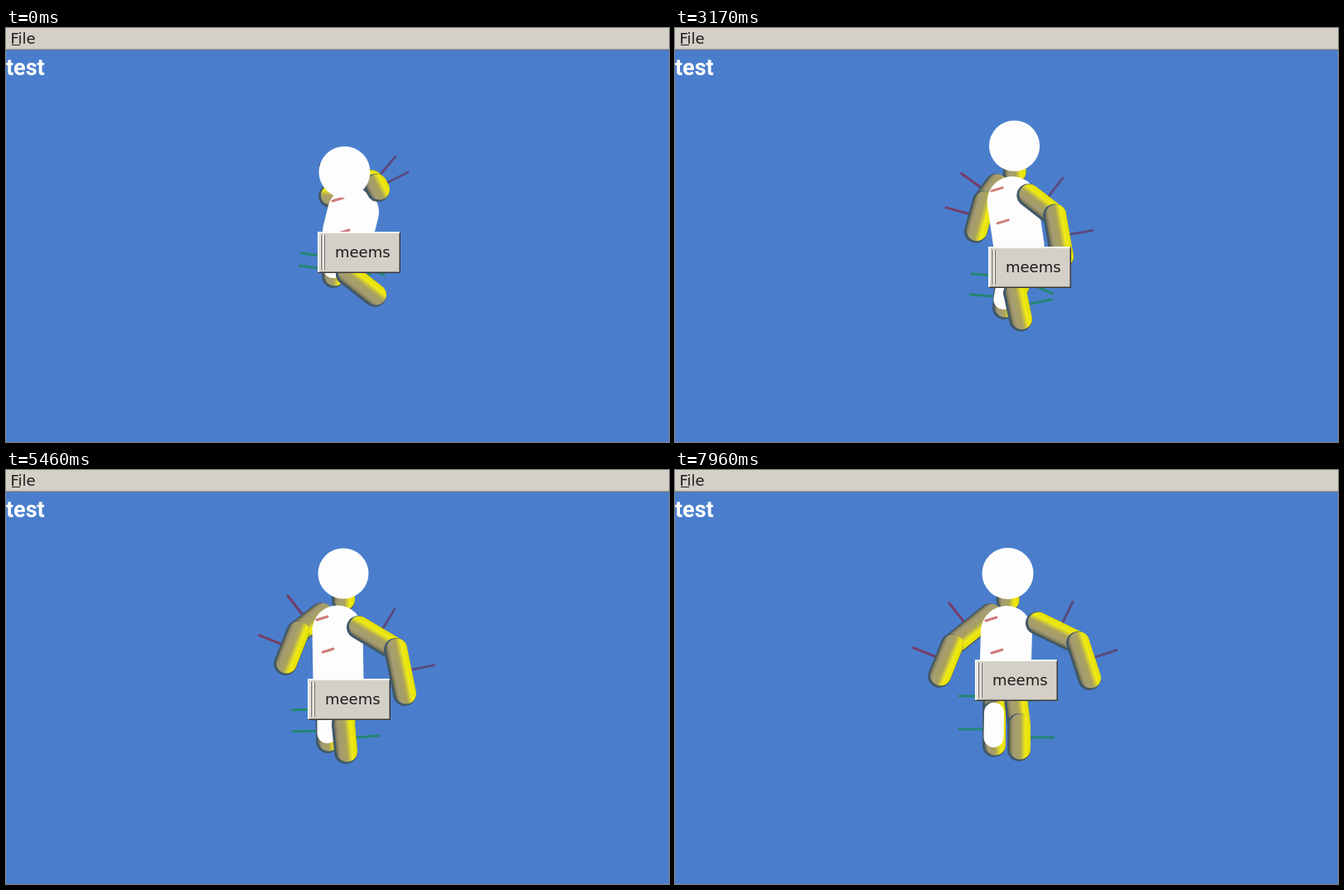
Write an HTML page with a canvas that moves like this. It is 800 px wide and 500 px high and loops after 8 s.

```html
<!DOCTYPE html>
<html>
<head>
<meta charset="utf-8">
<style>
html, body { margin: 0; width: 100%; height: 100%; overflow: hidden; background: #4a7ecd; }
canvas { display: block; }
</style>
</head>
<body>
<canvas id="stage" width="800" height="500"></canvas>
<script>
const c = document.getElementById('stage').getContext('2d');
const LOOP = 8000, STEP = 1000 / 24;
const WHITE = '#fdfdfd', INK = '#1c1c1c', FACE = '#d4d0c8';
const UI = '18px "DejaVu Sans", sans-serif';

// A pose is the head radius, then points: panel, head, chest, left elbow and hand,
// right shoulder, elbow and hand, left foot, right knee and foot.
const tuck = [31, 376,246, 408.5,174, 419,222, 397,203, 391,203,
  440,185, 446,190, 449,196, 395,300, 412,297, 445,323];
const lean = [29.5, 367,256, 467,185, 424,222, 410,196, 385,188,
  428,226, 402,258, 357,246, 402,336, 442,328, 408,346];
const crouch = [27.5, 372,250, 454,175, 414,218, 385,191, 346,187,
  430,219, 430,245, 400,244, 394,344, 444,315, 416,343];
const stand = [30.5, 364,252, 407,125, 400,194, 352,196, 337,234,
  425,190, 470,217, 481,271, 388,328, 407,308, 410,341];
const reach = [28, 364,240, 419.5,136, 389,187, 345,171, 301,158,
  425,186, 442,220, 445,225, 384,324, 412,295, 413,337];
const spread = [31, 362,229, 401.5,125, 400,195, 334,212, 319,249,
  437,185, 486,209, 500,252, 385,333, 415,308, 415,338];

const moved = (pose, dx, dy, squeeze = 1) => pose.map((v, i) =>
  i === 0 ? v : i % 2 ? 407 + (v - 407) * squeeze + dx : v + dy);
const tuckHigh = [30.5, 371, 228, ...moved(tuck, 2, -9).slice(3)];

const keys = [
  [0, tuck], [400, moved(tuck, 0, 38)], [760, moved(stand, 4, 14, .75)],
  [1380, lean], [2000, moved(spread, 14, -22, .95)],
  [2420, tuckHigh], [2840, moved(tuckHigh, 0, 44)], [3240, moved(stand, 4, 10, .75)],
  [3880, crouch], [4560, moved(spread, 8, -20)],
  [5460, stand], [6630, reach], [7080, moved(spread, 0, -21)], [7960, spread]
].map(([t, v]) => ({ t, v }));

function sample(t) {
  const last = keys.length - 1;
  let i = 0;
  while (i < last - 1 && t > keys[i + 1].t) i++;
  const a = keys[i], b = keys[i + 1];
  const before = keys[Math.max(0, i - 1)], after = keys[Math.min(last, i + 2)];
  const span = b.t - a.t, u = Math.min(1, (t - a.t) / span);
  const u2 = u * u, u3 = u2 * u;
  return a.v.map((v, k) => {
    const m = .7 * (b.v[k] - before.v[k]) / (b.t - before.t) * span;
    const n = .7 * (after.v[k] - v) / (after.t - a.t) * span;
    return v * (2 * u3 - 3 * u2 + 1) + b.v[k] * (3 * u2 - 2 * u3)
      + m * (u3 - 2 * u2 + u) + n * (u3 - u2);
  });
}

const add = ([x, y], dx, dy) => [x + dx, y + dy];
const mid = (a, b) => [(a[0] + b[0]) / 2, (a[1] + b[1]) / 2];

// Unit normal of a segment, on the side that faces (fx, fy).
function normal(a, b, fx, fy) {
  const dx = b[0] - a[0], dy = b[1] - a[1], len = Math.hypot(dx, dy) || 1;
  const side = dx * fy - dy * fx < 0 ? -1 : 1;
  return [-dy / len * side, dx / len * side];
}

function line(a, b, width, color) {
  c.lineWidth = width;
  c.strokeStyle = color;
  c.beginPath();
  c.moveTo(...a);
  c.lineTo(...b);
  c.stroke();
}

// A round limb lit from the upper right, with a dark rim on the far side.
function limb(a, b, r) {
  line(a, b, 2 * r, '#42596a');
  a = add(a, 1.5, -1);
  b = add(b, 1.5, -1);
  const [nx, ny] = normal(a, b, .75, -.5), m = mid(a, b);
  const g = c.createLinearGradient(...add(m, -nx * r, -ny * r), ...add(m, nx * r, ny * r));
  g.addColorStop(.05, '#77734f');
  g.addColorStop(.2, '#a39b73');
  g.addColorStop(.5, '#aaa25e');
  g.addColorStop(.72, '#f0ea16');
  g.addColorStop(1, '#dedb00');
  line(a, b, 2 * r - 3, g);
}

// Two limbs, each with a thin axis pointing away from the body.
function jointed(points, side, color) {
  const pairs = [points.slice(0, 2), points.slice(1)];
  for (const [a, b] of pairs) {
    const [nx, ny] = normal(a, b, side, -.5), m = mid(a, b);
    line(m, add(m, nx * 42, ny * 42), 3, color);
  }
  for (const [a, b] of pairs) limb(a, b, 14);
}

function rect(x, y, w, h, color) {
  c.fillStyle = color;
  c.fillRect(x, y, w, h);
}

function text(s, x, y, font, color) {
  c.font = font;
  c.fillStyle = color;
  c.fillText(s, x, y);
}

function panel(x, y) {
  x = Math.round(x);
  y = Math.round(y);
  rect(x, y, 100, 50, '#38383a');
  rect(x, y, 99, 49, '#f8f8f6');
  rect(x + 2, y + 2, 97, 47, '#85827c');
  rect(x + 2, y + 2, 96, 46, FACE);
  for (const gx of [3, 7]) {
    rect(x + gx, y + 4, 1, 42, '#fff');
    rect(x + gx + 1, y + 4, 1, 42, '#68655f');
  }
  text('meems', x + 21, y + 31, UI, INK);
}

function figure(t) {
  const [r, ...v] = sample(t);
  const [base, head, chest, lElbow, lHand, rShoulder, rElbow, rHand, lFoot, rKnee, rFoot] =
    Array.from({ length: v.length / 2 }, (_, i) => [v[2 * i], v[2 * i + 1]]);
  const lHip = add(base, 23, 24), rHip = add(base, 46, 24), lKnee = mid(lHip, lFoot);

  limb(head, add(head, 0, r + 2), 14);
  jointed([add(chest, -20, -20), lElbow, lHand], -1, '#753d67');
  line(chest, add(base, 37, 0), 2 * r, WHITE);
  jointed([lHip, lKnee, lFoot], -1, '#248573');
  line(lKnee, add(lFoot, -.5, -10), 24, WHITE);
  jointed([rHip, rKnee, rFoot], 1, '#248573');
  jointed([rShoulder, rElbow, rHand], 1, '#584b80');
  for (const stub of [add(chest, -25, -13), add(chest, -18, 26)]) {
    line(stub, add(stub, 13, -4), 3, '#cf7b7a');
  }
  line(head, head, 2 * r, WHITE);
  panel(...base);
}

function draw(now) {
  const t = Math.floor((now % LOOP) / STEP + .001) * STEP;
  c.lineCap = 'round';
  rect(0, 0, 800, 500, '#4a7ecd');
  figure(t);
  rect(0, 0, 800, 26, FACE);
  rect(0, 25, 800, 1, '#aaa7a1');
  rect(0, 26, 800, 1, '#66758f');
  text('File', 5.5, 19, UI, INK);
  rect(7, 20, 10, 1, INK);
  text('test', 0, 57, 'bold 27px Roboto, sans-serif', '#fff');
}

const start = performance.now();
function loop() {
  draw(performance.now() - start);
  requestAnimationFrame(loop);
}
loop();
</script>
</body>
</html>
```
